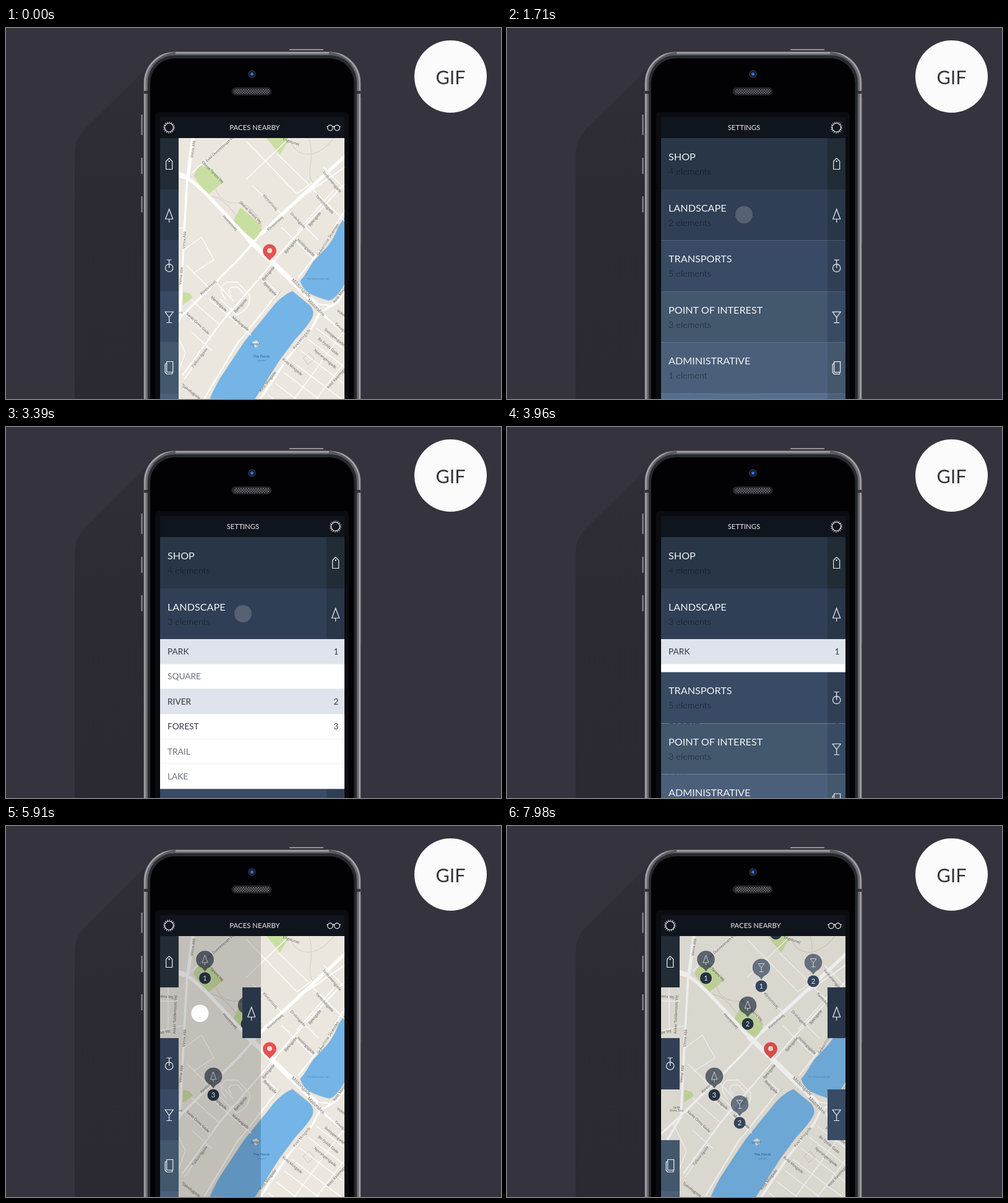
Recreate the animation shown at these times as an HTML page. Size 800x600 px, loop 8000 ms.

```html
<!DOCTYPE html>
<html lang="en">
<head>
<meta charset="utf-8">
<title>Map app</title>
<style>
  html, body { margin: 0; width: 100%; height: 100%; overflow: hidden; background: #35333d; }
  svg { display: block; width: 800px; height: 600px; font-family: Lato, sans-serif; }
  .line { fill: none; stroke: #eef0f2; stroke-width: 1.2; }
  .road { fill: none; stroke: #fff; stroke-linejoin: round; }
  .trail { fill: none; stroke: #d9d3c8; stroke-width: 1.3; }
  .labels { font: 6px "Open Sans", sans-serif; fill: #5c5a58; text-anchor: middle; }
  .bar { font-size: 11.4px; fill: #e6e8ea; text-anchor: middle; }
  .title { font-size: 16.2px; fill: #f0f2f4; }
  .count { font-size: 14.5px; font-weight: 300; fill: #000; fill-opacity: .6; }
  .item { font-size: 13.7px; }
</style>
</head>
<body>
<svg viewBox="0 0 800 600">
  <defs>
    <linearGradient id="shade" x1="0" y1="0" x2="0" y2="1">
      <stop offset="0" stop-color="#302e37"/><stop offset=".4" stop-color="#2c2a32"/><stop offset="1" stop-color="#2b2931"/>
    </linearGradient>
    <pattern id="mesh" width="4" height="4" patternUnits="userSpaceOnUse">
      <path d="M0 0L4 4M4 0L0 4" stroke="#77777d" stroke-width=".8"/>
    </pattern>
    <clipPath id="screen"><rect x="249" y="144" width="298" height="456"/></clipPath>
    <clipPath id="mapArea"><rect x="249" y="178" width="298" height="422"/></clipPath>
    <clipPath id="treeClip"><rect id="treeReveal" x="249" y="178" height="422"/></clipPath>
    <clipPath id="glassClip"><rect id="glassReveal" x="249" y="178" height="422"/></clipPath>
    <g id="icon0" class="line"><path d="M-5-4L0-9L5-4V9H-5Z"/><circle cy="-4" r=".6"/></g>
    <path id="icon1" class="line" d="M0-9.5L6 6.5H-6ZM0 6.5V12"/>
    <path id="icon2" class="line" d="M-4-9.5H4M0-9.5V3.5M6.2 3.5A6.2 6.2 0 1 1-6.2 3.5A6.2 6.2 0 1 1 6.2 3.5"/>
    <path id="icon3" class="line" d="M-6.5-8.5H6.5L0 .5ZM0 .5V9M-4.5 9H4.5"/>
    <path id="icon4" class="line" d="M-4-10H6V7H-4ZM-4-7L-6.5-6V7.5L-4 10H5V7"/>
  </defs>

  <rect width="800" height="600" fill="#35333d"/>
  <path d="M240 52L128 163Q111 180 111 202V600H400V52Z" fill="url(#shade)"/>
  <circle cx="718.5" cy="78.5" r="58.5" fill="#fbfbfb"/>
  <text x="718.5" y="90.5" font-size="30.5" text-anchor="middle" fill="#35333d">GIF</text>

  <g id="phone">
    <path d="M458 35H513M219.500 140V173M219.500 210V236M219.500 272V298" stroke="#929295" stroke-width="2"/>
    <path d="M573.5 112V350" stroke="#48464f" stroke-width="2"/>
    <rect x="222.5" y="38.5" width="351" height="700" rx="50" fill="#69696d"/>
    <rect x="224.5" y="40" width="347" height="700" rx="48.5" fill="none" stroke="#a3a3a6" stroke-width="2.5"/>
    <g id="edge" stroke="#59595e" stroke-width="4.5" fill="none">
      <path d="M238 61Q252 43 274 41"/><path d="M223 104H229" stroke="#303036"/>
    </g>
    <use href="#edge" transform="matrix(-1 0 0 1 796 0)"/>
    <rect x="229" y="44" width="338" height="700" rx="44" fill="#272a31"/>
    <rect x="233" y="49" width="329.5" height="700" rx="40" fill="#020103"/>
    <circle cx="397.5" cy="74.5" r="6.5" fill="#2b2c34"/>
    <circle cx="397.5" cy="74.5" r="4.3" fill="#15182a"/>
    <circle cx="397.5" cy="74.5" r="2.5" fill="#2f72e8"/>
    <rect x="364.5" y="96" width="65" height="13" rx="6.5" fill="#242429"/>
    <rect x="368" y="98.5" width="58" height="8" rx="4" fill="url(#mesh)"/>
    <rect x="241" y="136" width="313" height="500" rx="6" fill="#0b0c10"/>
  </g>

  <g clip-path="url(#mapArea)">
    <rect x="249" y="178" width="299" height="422" fill="#ebe7df"/>
    <g fill="#c9dfa0">
      <path d="M312 222L331 227L351 249L325 271L303 239Z"/>
      <path d="M379 290L412 318L414 333L400 342L366 314Z"/>
      <path d="M421 178H459L443 205Z"/>
      <path d="M286 427Q298 427 302 436L286 448Z"/>
    </g>
    <path class="trail" d="M304 240Q330 232 338 258T372 283T414 322M490 178Q496 200 492 222T498 252M460 185Q470 205 490 204T530 178M330 272Q350 272 372 304M480 534L490 526L498 536L488 544ZM540 338L505 390M445 425L380 500"/>
    <g fill="#74b4e6" stroke="#ddd5c8" stroke-width="1">
      <path d="M549 303L537 321Q528 346 512 361L496 378L481 402L475 409Q479 422 491 430Q508 438 522 441Q533 440 549 412Z"/>
      <path d="M329 600Q334 587 346 566L385 507L425 458Q442 434 463 425L492 449Q500 459 495 469Q488 482 468 503L442 538L402 601Z"/>
    </g>
    <path d="M398 508L405 505L411 512L403 517Z" fill="#dfe3d8"/>
    <g class="road" stroke-width="1.4">
      <path d="M300 235L362 178M388 183L470 268L495 250M388 245L458 178M398 255L447 302M440 205L488 252M513 225L549 262M497 262L549 314M462 300L505 343M445 322L496 372M530 262L470 330"/>
      <path d="M289 462L330 500M300 492L333 522M328 438L396 497M340 412L368 442M292 384L330 422M286 360L316 338L336 375L302 397M325 515L288 568M345 480L300 440M330 500L366 452M249 283H279M249 331L290 322M262 250V330M268 480L290 525L262 600M420 410L440 428"/>
      <path d="M356 440Q340 422 356 411H374L394 432Q395 456 372 464L346 438M365 434Q356 425 364 419H374L384 430"/>
      <path id="blocks"/>
    </g>
    <path class="road" stroke-width="2.2" d="M549 250L460 345L405 410L345 480L285 562M549 292L515 350L472 404M440 428L374 510L320 600M549 224L485 268M500 446L520 470L549 496M500 446L524 449L535 444M465 408L490 438"/>
    <path class="road" stroke-width="3.5" d="M555 415L535 444L507 460L496 482L455 534L411 600M411 334L378 372L290 460L249 498M293 240L288 330L281 470L252 520"/>
    <path class="road" stroke-width="5.5" d="M549 206L493 258L411 334M302 178L294 240M249 226L290 241Q306 250 330 275L395 345"/>
    <path class="road" stroke-width="8" d="M249 226L290 241M390 340L430 378L503 449"/>
    <g class="labels" id="labels"></g>
    <path d="M426 376L417.5 367.5A11 11 0 1 1 434.5 367.5Z" fill="#e5514f"/>
    <circle cx="426" cy="360" r="4" fill="#f5dcd2"/>
    <g clip-path="url(#treeClip)" id="treePins"></g>
    <g clip-path="url(#glassClip)" id="glassPins"></g>
    <rect id="dim" x="249" y="178" height="422"/>
  </g>

  <g clip-path="url(#screen)">
    <rect x="249" y="144" width="299" height="34" fill="#10141c"/>
    <g id="panel">
      <text class="bar" x="383" y="165">SETTINGS</text>
      <g class="line" transform="translate(532.5 161)">
        <circle r="7"/><circle r="8.5" stroke-width="2" stroke-dasharray="1.1 2.238"/>
      </g>
      <text class="bar" x="671" y="165">PACES NEARBY</text>
      <path class="line" d="M787 159.500H789M808 159.500H810M797 160Q798.500 158.500 800 160"/>
      <g class="line"><circle cx="793" cy="161.5" r="4.3"/><circle cx="804" cy="161.5" r="4.3"/></g>
      <g id="upperRows"></g>
      <g id="list"></g>
      <g id="lowerRows"></g>
    </g>
    <circle id="touch" r="14" fill="#fff"/>
  </g>
</svg>

<script>
const $ = id => document.getElementById(id);
const TRAVEL = 269, ROW = 82.5, ITEM = 40.4, LIST_HEIGHT = 6 * ITEM;

// Settings rows: each side tile takes the colour of the row above.
const colours = ['#212c36', '#293648', '#303f55', '#384a64', '#43576d', '#4b5f7b', '#55708f'];
const rows = [['SHOP', '4 elements'], ['LANDSCAPE', '2 elements'], ['TRANSPORTS', '5 elements'],
  ['POINT OF INTEREST', '3 elements'], ['ADMINISTRATIVE', '1 element'], ['', '']];
rows.forEach(([title, count], i) => {
  const y = Math.round(178.4 + i * ROW), height = Math.round(178.4 + (i + 1) * ROW) - y;
  $(i < 2 ? 'upperRows' : 'lowerRows').innerHTML += `
    <rect x="248" y="${y}" width="270" height="${height}" fill="${colours[i + 1]}"/>
    <text class="title" x="261" y="${y + 35.5}">${title}</text>
    <text class="count" id="count${i}" x="261" y="${y + 58.5}">${count}</text>
    <g id="tile${i}"><rect x="518" y="${y}" width="30" height="${height}" fill="${colours[i]}"/>
    ${i < 5 ? `<use href="#icon${i}" x="532.7" y="${y + 41.5}"/>` : ''}</g>`;
});

['PARK', 'SQUARE', 'RIVER', 'FOREST', 'TRAIL', 'LAKE'].forEach((name, i) => {
  const y = 343 + i * ITEM, chosen = i === 0 || i === 2;
  $('list').innerHTML += `
    <rect x="248" y="${y}" width="300" height="${ITEM + .5}" fill="${chosen ? '#dfe3eb' : '#fff'}"/>
    <path d="M248 ${y + ITEM}h300" stroke="#dfe1e5"/>
    <text class="item" id="item${i}" x="261" y="${y + 25}" fill="${chosen ? '#343a44' : '#69717e'}">${name}</text>
    <text class="item" id="number${i}" x="533.5" y="${y + 25}" text-anchor="middle" fill="#343a44">${{0: 1, 2: 2, 3: 3}[i] || ''}</text>`;
});

const pin = (icon, colour) => ([x, y, n]) => `
  <g fill="${colour}" opacity=".7"><path d="M${x - 5} ${y + 13}h10l-5 6z"/><circle cx="${x}" cy="${y}" r="14.3"/></g>
  <use href="#icon${icon}" transform="translate(${x} ${y}) scale(.75)"/>
  <circle cx="${x}" cy="${y + 30}" r="9.5" fill="${colour}"/>
  <text x="${x}" y="${y + 34}" font-size="11" fill="#fff" text-anchor="middle">${n}</text>`;
$('treePins').innerHTML = [[321.5, 216, 1], [389, 290, 2], [335, 405, 3], [434.5, 144, 2]].map(pin(1, '#293648')).join('');
$('glassPins').innerHTML = [[411, 229, 1], [495, 221, 2], [376, 450, 2]].map(pin(3, '#384a64')).join('');

// Parallel streets in the lower right corner.
$('blocks').setAttribute('d', Array.from({length: 8}, (_, i) =>
  `M${514 - 13 * i} ${467 + 18 * i}l80 61`).join('') + 'M549 486L466 600M549 538L500 602');

const label = ([name, x, y, angle]) =>
  `<text transform="translate(${x} ${y}) rotate(${angle})" y="2">${name}</text>`;
$('labels').innerHTML = [
  ['Vimre Allé', 302, 196, -82], ['Vimre Allé', 288, 343, -86], ['Vimre Allé', 283, 401, -84],
  ['Eskil Dunnestrups Vej', 346, 195, -42], ['Olvine Tarens Vej', 334, 233, 45],
  ['Olvine Tarens Vej', 395, 298, 45], ['Anker Tvildemoses Vej', 273, 305, -88],
  ['kens Vej', 259, 276, 5], ['ske Vej', 256, 333, -12], ['Hvorensvej', 362, 315, 47],
  ['Klintomsvej', 427, 282, 47], ['Klintomsvej', 435, 316, -42], ['Klintomsvej', 327, 420, -42],
  ['Engstunet', 461, 184, 20], ['Vastumersgade', 527, 249, 50], ['Tormoldsgade', 515, 285, 47],
  ['Drolvisgade', 472, 311, 47], ['Bjeksgade', 499, 309, -50], ['Bjeksgade', 460, 353, -50],
  ['Bjeksgade', 424, 397, -50], ['Bjeksgade', 379, 449, -48], ['Bjeksgade', 427, 422, 47],
  ['Hoslingsgade', 485, 355, 45], ['Gråvemose Skrænten', 520, 342, -57],
  ['Kvist Mosgade', 542, 428, -52], ['Kvist Mosgade', 478, 503, -50], ['Kvist Mosgade', 423, 572, -52],
  ['Mønlysgade', 344, 446, 44], ['Mønlysgade', 379, 478, 40], ['Sankt Orms Gade', 310, 478, 43],
  ['Falkvordgade', 313, 533, -53], ['Tjalvebygade', 299, 588, 38], ['Kvist Mosgade', 463, 548, 40],
  ['Vokersgade', 549, 466, 35], ['Tinvagade', 543, 487, 40], ['Sivtoppesgade', 531, 500, 40],
  ['Bo Fjolds Gade', 521, 515, 40], ['Nyvrangersgade', 516, 535, 40], ['Kvist Kalomsgade', 536, 564, -48],
].map(label).join('')
  + `<g font-size="7">${[['Mildorsgade', 477, 421, 44], ['Mildorsbro', 501, 452, 44]].map(label).join('')}</g>`
  + `<g font-size="4.5">${[['Sankt', 274, 455, 0], ['Orms Torv', 274, 460, 0]].map(label).join('')}</g>`
  + `<g fill="#24588c" font-size="5.5">${[['The Ponds', 413, 531, 0], ['Lyngø', 403, 511, 0]].map(label).join('')}</g>`
  + `<g fill="#4283b5" font-size="4">${[['The Gråvemose Sø', 504, 405, 0], ['(ponds)', 413, 537, 0]].map(label).join('')}</g>`;

const progress = (t, start, length) => Math.min(1, Math.max(0, (t - start) / length));

// Ease with handles (a, 0) and (b, 1), solved by bisection.
function ease(x, a, b) {
  let low = 0, high = 1, u;
  for (let i = 0; i < 20; i++) {
    u = (low + high) / 2;
    const v = 1 - u;
    if (3 * a * v * v * u + 3 * b * v * u * u + u ** 3 < x) low = u; else high = u;
  }
  return u * u * (3 - 2 * u);
}
const slide = (t, start) => ease(progress(t, start, 660), .2, .8);
const unfold = (t, start) => ease(progress(t, start, 655), .2, .5);
const swipe = (t, start) => ease(progress(t, start + 38, 607), .2, .5);

const move = (id, x, y = 0) => $(id).setAttribute('transform', `translate(${x} ${y})`);
const TREE = 5640, GLASS = 7140;
const touches = [ // start, hold, x, y, drag
  [320, 130, 264, 161, 0], [1700, 130, 383, 302, 0], [3380, 130, 383, 302, 0],
  [4430, 130, 532.5, 161, 0], [TREE - 10, 440, 264, 303, 100], [GLASS - 10, 440, 264, 467, 100],
];

function draw(t) {
  move('panel', TRAVEL * (slide(t, 342) - slide(t, 4462) - 1));

  const opened = LIST_HEIGHT * (unfold(t, 1705) - unfold(t, 3570));
  move('lowerRows', 0, opened);
  $('list').style.display = opened > .01 ? '' : 'none';

  const picked = progress(t, 2560, 180);
  $('item3').setAttribute('fill', `rgb(${105 - 53 * picked},${113 - 55 * picked},${126 - 58 * picked})`);
  $('number3').setAttribute('opacity', picked);
  $('count1').textContent = `${picked < .5 ? 2 : 3} elements`;

  const tree = swipe(t, TREE), glass = swipe(t, GLASS);
  move('tile1', TRAVEL * tree);
  move('tile3', TRAVEL * glass);
  const reach = p => p > 0 ? 30 + TRAVEL * p : 0;
  $('treeReveal').setAttribute('width', reach(tree));
  $('glassReveal').setAttribute('width', reach(glass));
  const [start, swept] = t < GLASS ? [TREE, tree] : [GLASS, glass];
  $('dim').setAttribute('width', reach(swept));
  $('dim').setAttribute('opacity', .175 * (1 - progress(t, start + 750, 150)));

  const touch = touches.find(([from, hold]) => t >= from && t < from + hold + 150);
  $('touch').setAttribute('opacity', 0);
  if (touch) {
    const [from, hold, x, y, drag] = touch;
    move('touch', x + drag * swipe(t, from + 10), y);
    $('touch').setAttribute('opacity', progress(t, from, 60) * (1 - progress(t, from + hold, 150)));
  }
}

function frame() {
  draw(performance.now() % 8000);
  requestAnimationFrame(frame);
}
frame();
</script>
</body>
</html>
```
